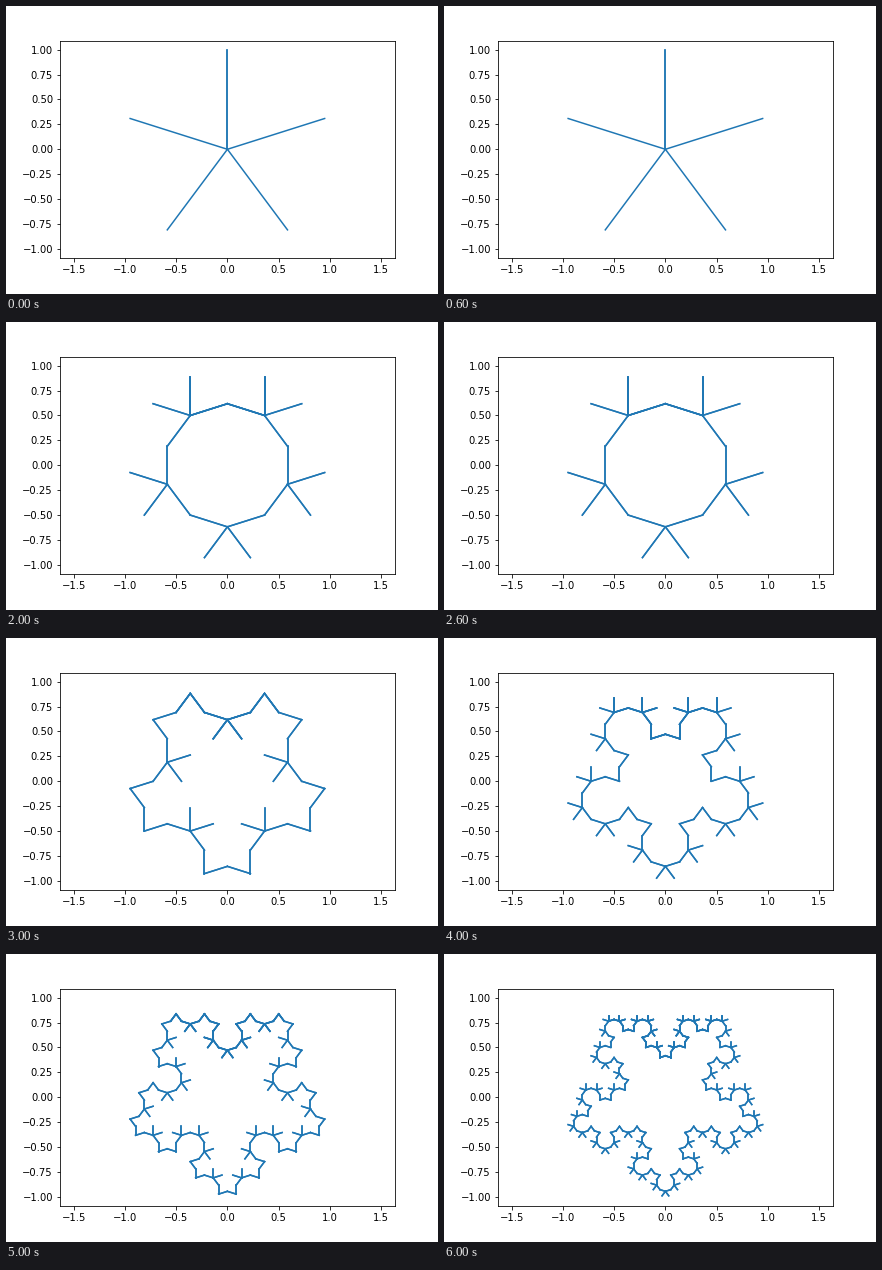
Animation, 432 px wide and 288 px high, one loop 7000 ms. Source, as a matplotlib script:

```python
import math

import numpy as np
import matplotlib.pyplot as plt
from matplotlib.animation import FuncAnimation

PHI = (1 + math.sqrt(5)) / 2
TURN = math.pi / 5
STEPS = 7


def polar(radius, angle):
    return complex(radius * math.cos(angle), radius * math.sin(angle))


# Five spokes pointing inwards; the top one closes the circle and is drawn twice.
SPOKES = [(polar(1, math.pi / 2 + 2 * TURN * k), 0j) for k in range(6)]


def branch(segments):
    """Replace each segment by two shorter ones, forked about its start."""
    forked = []
    for start, end in segments:
        for angle in (TURN, -TURN):
            tip = start + (end - start) * polar(1 / PHI, angle)
            forked.append((tip, start))
    return forked


generations = [SPOKES]
for _ in range(STEPS - 1):
    generations.append(branch(generations[-1]))

fig, ax = plt.subplots(figsize=(6, 4), dpi=72)
fig.subplots_adjust(left=0.125, right=0.9, bottom=0.125, top=0.88)
ax.set_xlim(-1.637, 1.637)
ax.set_ylim(-1.0915, 1.0915)
ax.set_xticks(np.linspace(-1.5, 1.5, 7))
ax.set_yticks(np.linspace(-1, 1, 9))
lines = []


def clear():
    while lines:
        lines.pop().remove()
    return []


def draw(step):
    clear()
    passes = 2 if step else 1
    for a, b in generations[step] * passes:
        lines.extend(ax.plot([a.real, b.real], [a.imag, b.imag],
                             color="#1f77b4", linewidth=1.5))
    return lines


anim = FuncAnimation(fig, draw, frames=STEPS, init_func=clear,
                     interval=1000, repeat=True, repeat_delay=0)
plt.show()
```
